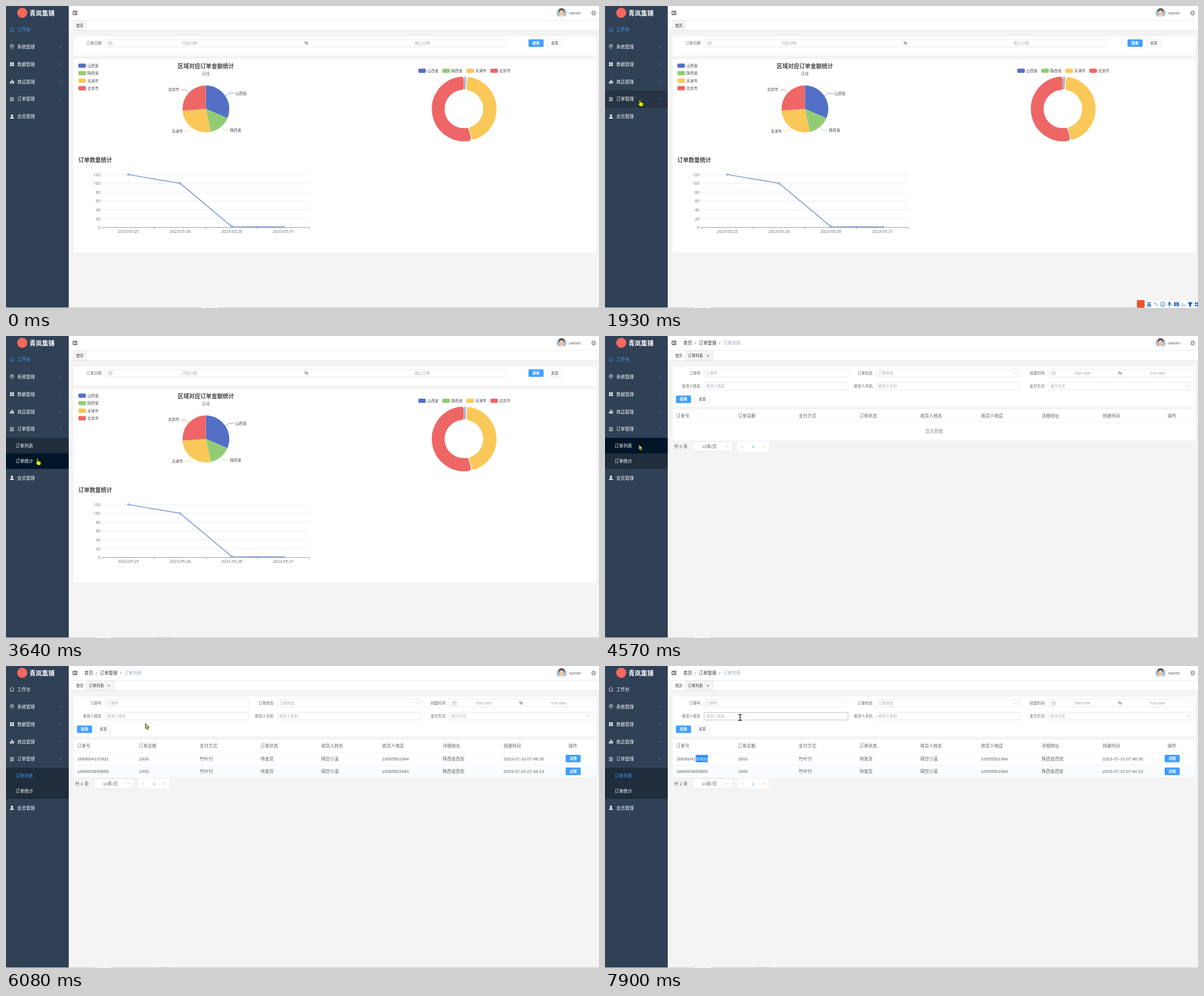
These frames come from a looping animation (1049x534 px, 8 s). An HTML page:

```html
<!DOCTYPE html>
<html>
<head>
<meta charset="utf-8">
<title>Order dashboard</title>
<style>
html, body { margin: 0; width: 100%; height: 100%; overflow: hidden; background: #f4f4f4; }
svg { display: block; width: 100%; height: 100%; }
text { font-family: "Liberation Sans", "Noto Sans CJK SC", sans-serif; white-space: pre; }
.axis text { font-family: "Noto Sans", sans-serif; }
</style>
</head>
<body>
<svg id="stage" viewBox="0 0 1049 534"></svg>
<script>
const LOOP = 8000, BIG = 7.74, SMALL = 6.64;
const BLUE = '#409eff', INK = '#606266', HINT = '#a8abb2', EDGE = '#dcdfe6';
const PALETTE = ['#5470c6', '#91cc75', '#fac858', '#ee6666'];
const REGIONS = ['山西省', '陕西省', '天津市', '北京市'];
const MENU = ['工作台', '系统管理', '数据管理', '商品管理', '订单管理', '会员管理'];
const ORDER_NO = '1689004107831', DIGIT = BIG * 0.5562;

// ---- drawing helpers (text is placed by its vertical centre) ----
const text = (x, y, s, { size = BIG, fill = INK, anchor = 'start', bold = false, id = '' } = {}) =>
  `<text x="${x}" y="${y + size * 0.37}" font-size="${size}" fill="${fill}" text-anchor="${anchor}"` +
  `${bold ? ' font-weight="700"' : ''}${id ? ` id="${id}"` : ''}>${s}</text>`;
const rect = (x, y, w, h, fill, more = '') =>
  `<rect x="${x}" y="${y}" width="${w}" height="${h}" fill="${fill}" ${more}/>`;
const line = (d, stroke = HINT, width = 0.7, more = '') =>
  `<path d="${d}" fill="none" stroke="${stroke}" stroke-width="${width}" ${more}/>`;
const group = (id, body, more = '') => `<g id="${id}" ${more}>${body}</g>`;
const chevron = (x, y, color = HINT) => line(`M${x - 2.6} ${y - 1.3}l2.6 2.6l2.6 -2.6`, color);
const box = (x, y, w, h = 13.3) => rect(x, y, w, h, '#fff', `rx="1.8" stroke="${EDGE}" stroke-width=".7"`);
const small = (x, y, s, fill = HINT, anchor = 'start') => text(x, y, s, { size: SMALL, fill, anchor });
const label = (x, y, s) => small(x, y, s, INK, 'end');
const calendar = (x, y) =>
  line(`M${x - 3.3} ${y - 2.6}h6.6v5.8h-6.6zM${x - 3.3} ${y - .6}h6.6M${x - 1.6} ${y - 3.6}v1.6M${x + 1.6} ${y - 3.6}v1.6M${x - 2} ${y + 1.2}h4`, HINT, 0.6);
const button = (x, y, s, primary, id = '') =>
  (primary ? rect(x, y, 26.6, 13.3, BLUE, 'rx="1.7"') : box(x, y, 26.6)) +
  (id ? rect(x, y, 26.6, 13.3, '#fff', `rx="1.7" id="${id}" opacity="0"`) : '') +
  text(x + 13.3, y + 6.6, s, { size: SMALL, fill: primary ? '#fff' : INK, anchor: 'middle', bold: primary });
const polar = (cx, cy, r, deg) => {
  const a = deg * Math.PI / 180;
  return `${(cx + r * Math.sin(a)).toFixed(2)} ${(cy - r * Math.cos(a)).toFixed(2)}`;
};

// ---- side menu ----
const icons = [
  line('M-3.6 0L0 -3.6L3.6 0M-2.7 -.6V3.6H2.7V-.6', 'currentColor', 0.8),
  line('M0 3.8C-2 1.8 -3 .4 -3 -1A3 2.9 0 0 1 3 -1C3 .4 2 1.8 0 3.8z', 'currentColor', 0.8) + '<circle cy="-.9" r="1.1" fill="none" stroke="currentColor" stroke-width=".7"/>',
  [[-3.4, -3.2], [.4, -3.2], [-3.4, .5], [.4, .5]].map(([x, y]) => rect(x, y, 3, 2.9, 'currentColor')).join(''),
  [[-3.4, 0], [-.9, -3.5], [1.7, -1.4]].map(([x, y]) => rect(x, y, 1.7, 3.5 - y, 'currentColor')).join(''),
  line('M-3.6 -2.4H3.6M-3.6 .2H3.6M-3.6 2.8H3.6M-1.5 -3.4v2M1.6 -.8v2M-1.5 1.8v2', 'currentColor', 0.9),
  '<circle cy="-1.7" r="2" fill="currentColor"/><path d="M-3.5 3.5C-3.5 -.2 3.5 -.2 3.5 3.5z" fill="currentColor"/>'
];
const rowY = i => 41 + 30.9 * i;
const menuItem = i => group('menu' + i,
  rect(0, rowY(i) - 15.5, 111, 31, '#263445', `id="hover${i}" opacity="0"`) +
  `<g transform="translate(10.5 ${rowY(i)})">${icons[i]}</g>` +
  text(20, rowY(i), MENU[i], { fill: 'currentColor' }) +
  (i > 0 && i < 5 ? `<g transform="translate(96.5 ${rowY(i)})"><g id="arrow${i}">${chevron(0, 0, '#7b8797')}</g></g>` : ''),
  'style="color:#fff"');
const subItem = (i, s) => group('sub' + i,
  rect(0, 180 + 27.6 * i, 111, 27.6, '#001528', `id="subHover${i}" opacity="0"`) +
  text(17, 193.7 + 27.6 * i, s, { fill: 'currentColor' }), 'style="color:#fff"');
const sidebar = rect(0, 0, 111, 534, '#304156') +
  '<circle cx="28.7" cy="12" r="9" fill="#f4685f"/>' +
  text(41.5, 12.6, '青岚集铺', { size: 11.1, fill: '#fff', bold: true }) +
  MENU.map((_, i) => menuItem(i)).join('') +
  '<clipPath id="fold"><rect id="foldBox" x="0" y="180" width="111" height="0"/></clipPath>' +
  `<g clip-path="url(#fold)">${rect(0, 180, 111, 55.2, '#1f2d3d')}${subItem(0, '订单列表')}${subItem(1, '订单统计')}</g>`;

// ---- top bar ----
const header = rect(111, 0, 938, 43.5, '#fff') + rect(111, 25, 938, 0.8, '#e6e6e6') + rect(111, 43, 938, 0.8, '#e4e4e4') +
  line('M118 9.3h8.3M121 12.2h5.3M118 15.1h8.3', '#222', 1.2) + '<path d="M117.8 10.7v3l2.2 -1.5z" fill="#222"/>' +
  '<clipPath id="face"><circle cx="982.8" cy="12" r="8.9"/></clipPath><g clip-path="url(#face)">' +
  rect(973, 3, 20, 20, '#a9c0d3') + '<ellipse cx="982.8" cy="21.5" rx="7" ry="5" fill="#eef1f3"/>' +
  '<circle cx="982.8" cy="9.3" r="4.9" fill="#4a3b35"/><ellipse cx="982.8" cy="12" rx="4" ry="4.8" fill="#efc5a2"/></g>' +
  text(996, 12.4, 'owner') +
  line('M1035.6 12.4a4 4 0 1 0 8 0a4 4 0 1 0 -8 0h8M1037.6 12.4a2 4 0 1 0 4 0a2 4 0 1 0 -4 0M1036.3 10.2h6.6M1036.3 14.6h6.6', '#777', 0.6);

// ---- dashboard page ----
const swatch = (x, y, i, tx) => rect(x, y - 3.8, 13.4, 7.6, PALETTE[i], 'rx="2.2"') + small(tx, y, REGIONS[i], '#444');
const legends = REGIONS.map((_, i) => swatch(128, 105.5 + 13.3 * i, i, 144) + swatch(729.3 + 42.5 * i, 114.5, i, 745.3 + 42.4 * i)).join('');
const cuts = [0, 113, 168, 266, 360];
const pie = PALETTE.map((c, i) => `<path fill="${c}" d="M353.6 182L${polar(353.6, 182, 41.4, cuts[i])}A41.4 41.4 0 0 1 ${polar(353.6, 182, 41.4, cuts[i + 1])}z"/>`).join('') +
  line('M388 159L395 154.4H403.5', PALETTE[0]) + small(405.8, 154.3, REGIONS[0], '#444') +
  line('M380 214L386 219.6H394', PALETTE[1]) + small(396.2, 219.4, REGIONS[1], '#444') +
  line('M328.5 215L324 221.7H315.5', PALETTE[2]) + small(313, 221.6, REGIONS[2], '#444', 'end') +
  line('M323 153.5L318.5 148.3H309', PALETTE[3]) + small(306.5, 148, REGIONS[3], '#444', 'end');

// Ring sector with rounded corners: an inset outline fattened by a round-joined stroke
function ringPart(from, to, color) {
  const pt = (r, deg, side) => polar(810.5, 182, r, deg + side * Math.asin(5.1 / r) * 180 / Math.PI);
  const big = to - from > 190 ? 1 : 0;
  return `<path fill="${color}" stroke="${color}" stroke-width="9" stroke-linejoin="round" d="M${pt(38.2, from, 1)}L${pt(52.8, from, 1)}` +
    `A52.8 52.8 0 ${big} 1 ${pt(52.8, to, -1)}L${pt(38.2, to, -1)}A38.2 38.2 0 ${big} 0 ${pt(38.2, from, 1)}z"/>`;
}
const ring = ringPart(4.84, 166.3, PALETTE[2]) + ringPart(166.3, 360, PALETTE[3]) +
  line(`M${polar(810.5, 182, 34.5, 1.6)}L${polar(810.5, 182, 57, 1.6)}`, PALETTE[0], 1.5) +
  line(`M${polar(810.5, 182, 40, 4)}L${polar(810.5, 182, 57, 4)}`, PALETTE[1], 0.4);

const sales = [['2023-05-25', 120], ['2023-05-26', 100], ['2023-05-28', 2], ['2023-05-31', 1]];
const vy = v => 391.5 - v * 0.7792, px = i => 216.6 + 91.4 * i;
let chart = '';
for (let v = 0; v <= 120; v += 20) {
  if (v) chart += line(`M171 ${vy(v)}H536.6`, '#e0e6f1', 0.7);
  chart += text(167, vy(v), v, { size: 7.1, fill: '#6e7079', anchor: 'end' });
}
chart += line('M171 391.6H536.6' + [0, 1, 2, 3, 4].map(i => `M${171 + 91.4 * i} 391.6v3`).join(''), '#6e7079', 0.7);
chart += line('M' + sales.map(([, v], i) => `${px(i)} ${vy(v)}`).join('L'), PALETTE[0], 1.1);
sales.forEach(([day, v], i) => {
  chart += `<circle cx="${px(i)}" cy="${vy(v)}" r="1.5" fill="#fff" stroke="${PALETTE[0]}" stroke-width="1"/>` +
    text(px(i), 398.6, day, { size: 7.1, fill: '#6e7079', anchor: 'middle' });
});
const title = (x, y, s, anchor) => text(x, y, s, { size: 9.96, fill: '#464646', bold: true, anchor });
const home = rect(119, 26, 23, 17, '#f4f4f4', 'stroke="#e2e2e2" stroke-width=".6"') + small(130.6, 34.4, '首页', '#303133', 'middle') +
  rect(120, 54, 924.6, 33.5, '#fff') + rect(120, 94, 924.6, 342, '#fff') +
  label(169, 65.6, '订单日期') + box(175.3, 59, 711) + calendar(184.6, 65.6) +
  small(325, 65.6, '开始日期', HINT, 'middle') + small(531, 65.6, 'To', '#303133', 'middle') + small(736.6, 65.6, '截止日期', HINT, 'middle') +
  button(924.3, 59, '搜索', true) + button(957.3, 59, '重置') +
  title(353.6, 106.3, '区域对应订单金额统计', 'middle') + small(353.6, 120, '区域', '#6e7079', 'middle') +
  legends + pie + ring + title(128, 272, '订单数量统计', 'start') + `<g class="axis">${chart}</g>`;

// ---- order list page ----
const columns = [126, 235.3, 342.8, 450.2, 557.7, 665.2, 772.6, 880.1];
const heads = ['订单号', '订单总额', '支付方式', '订单状态', '收货人姓名', '收货人电话', '详细地址', '创建时间'];
const order = (no, sum, time) => [no, sum, '竹叶付', '待发货', '晴空小溪', '10055501984', '陕西省西安', time];
const orders = [order(ORDER_NO, '1800', '2023-07-10 07:48:30'), order('1689003850665', '1900', '2023-07-10 07:44:13')];
const cells = (list, y, row = -1) => list.map((s, i) => text(columns[i], y, s, { id: row === 0 && i === 0 ? 'number' : '' })).join('');
const row = (r, y) => rect(120, y, 924.6, 22.6, r ? '#fafcff' : '#fff') +
  rect(120, y, 924.6, 22.6, '#f0f3f7', `id="rowHover${r}" opacity="0"`) + rect(120, y + 22, 924.6, 0.6, '#ebeef5') +
  (r ? '' : rect(0, y + 4.6, 0, 13, '#3390ff', 'id="mark"')) + cells(orders[r], y + 11.1, r) +
  (r ? '' : text(0, y + 11.1, '', { fill: '#fff', id: 'marked' })) + button(990, y + 4.4, '详情', true);
const field = (x, y, name) => label(x - 6.3, y + 6.6, name) + box(x, y, 254.6);
const hint = (x, y, s) => small(x + 3.8, y + 6.6, s);
const names = [['订单号', '订单状态', '创建时间'], ['收货人姓名', '收货人手机', '支付方式']];
const fieldX = c => 175.3 + 304.3 * c, fieldY = r => 59 + 23.2 * r;
const form = names.map((list, r) => list.map((s, c) =>
  field(fieldX(c), fieldY(r), s) + (r === 0 && c === 2 ? '' : hint(fieldX(c), fieldY(r), s))).join('')).join('') +
  chevron(726.8, 65.6) + chevron(1031, 88.8) + calendar(793.2, 65.6) +
  small(844.6, 65.6, 'Start date', HINT, 'middle') + small(911, 65.6, 'To', '#303133', 'middle') + small(978, 65.6, 'End date', HINT, 'middle') +
  [0, 1].map(r => `<rect id="focus${r}" x="175.3" y="${fieldY(r)}" width="254.6" height="13.3" rx="1.8" fill="none" stroke="#a9adb6" stroke-width=".8" opacity="0"/>`).join('') +
  button(125.6, 105.3, '搜索', true, 'searchHover') + button(158.7, 105.3, '重置');
const pager = text(122.3, 195.6, '共 0 条', { id: 'total' }) + box(155.3, 186.8, 70.4, 17) +
  text(184.6, 195.6, '10条/页', { anchor: 'middle' }) + chevron(216, 195.6) + rect(234.6, 186.4, 54.6, 17.6, '#fff', 'rx="1"') +
  line('M252.7 186.4v17.6M271 186.4v17.6', '#f4f4f4', 0.8) +
  line('M244.3 193.1l-2.4 2.4l2.4 2.4M278.8 193.1l2.4 2.4l-2.4 2.4', HINT, 0.8) + text(262, 195.6, '1', { fill: BLUE, anchor: 'middle' });
const list = text(138.5, 12.4, '首页', { fill: '#303133' }) + text(158.8, 12.4, '/') + text(166, 12.4, '订单管理', { fill: '#303133' }) +
  text(201.8, 12.4, '/') + text(209, 12.4, '订单列表', { fill: '#97a8be' }) +
  rect(142, 26, 49, 17, '#f4f4f4', 'stroke="#e2e2e2" stroke-width=".6"') + line('M119 26v17', '#e2e2e2', 0.6) +
  small(130.6, 34.4, '首页', '#303133', 'middle') + small(146.6, 34.4, '订单列表', '#303133') + line('M180 33l3.8 3.8M183.8 33l-3.8 3.8', '#555', 0.7) +
  rect(120, 54, 924.6, 70.4, '#fff') + form +
  rect(120, 130, 924.6, 22.4, '#fff') + cells(heads, 140.8) + text(1003, 140.8, '操作', { anchor: 'middle' }) + rect(120, 152, 924.6, 0.6, '#ebeef5') +
  group('empty', rect(120, 152.6, 924.6, 32, '#fff') + text(582.3, 168.6, '暂无数据', { fill: '#909399', anchor: 'middle' })) +
  group('rows', row(0, 152.6) + row(1, 175.2)) + group('pager', pager);

// ---- input method bar ----
const IME = '#1767c5';
const ime = rect(954, 521, 95, 13, '#fff') + rect(941, 520, 13.5, 13.5, '#f0522c', 'rx="1"') +
  text(962.5, 527.4, '英', { size: 8.5, fill: IME, anchor: 'middle', bold: true }) +
  '<circle cx="973" cy="526" r="1" fill="#1767c5"/>' + line('M976.5 527.5l-.8 2', IME, 1.2) +
  line('M982.4 527.4a4 4 0 1 0 8 0a4 4 0 1 0 -8 0M984.2 528.4q2.2 2.4 4.4 0M985 525.6v1M987.8 525.6v1', IME, 0.9) +
  rect(997, 523, 3.2, 5.4, IME, 'rx="1.6"') + line('M995.6 526.5q0 3.2 3 3.2t3 -3.2M998.6 529.7v2', IME, 0.9) +
  rect(1006.5, 524, 9, 6.8, IME, 'rx="1"') + line('M1008 526h6M1008 527.8h6M1009.5 529.5h3', '#fff', 0.7) +
  line('M1022 524v4M1020 531q0 -3 3.5 -3t3.5 3z', '#b4bac2', 1.2) +
  '<path d="M1031 525l2.6 -1.6h3l2.6 1.6l-1 2l-1.2 -.4v5h-3.8v-5l-1.2 .4z" fill="#1767c5"/>' +
  [1043.5, 1047].map(x => rect(x, 524, 2.8, 3, IME) + rect(x, 528, 2.8, 3, IME)).join('');

// ---- pointer shapes, hot spot at 0,0 ----
const pointers =
  group('hand', '<path d="M-1.3 .8Q-1.2 -.4 -.2 -.4T.9 .8V4L4.6 5Q6 5.4 5.9 7L5.5 9.6Q5 11.6 3 11.6H1Q-.2 11.6 -1 10.4L-3.2 7.2Q-3.4 5.9 -2.2 6.1L-1.3 7z" fill="#dcf000" stroke="#20240a" stroke-width=".8"/>') +
  group('arrow', '<path d="M0 0V9.4L2.2 7.4L4 11L5.7 10.2L4 6.8H7z" fill="#d6cb62" stroke="#39361c" stroke-width=".9" stroke-linejoin="round"/>') +
  group('beam', line('M-3 -5.2H3M0 -5.2V5.2M-3 5.2H3', '#4b3828', 1.6));

document.getElementById('stage').innerHTML = rect(0, 0, 1049, 534, '#f4f4f4') + header + group('home', home) + group('list', list) +
  sidebar + rect(0, 533, 1049, 1, '#d0d2d4') + rect(347, 533, 27, 1, '#fafafa', 'id="tab"') + rect(266, 533, 27, 1, '#b9bcc0', 'id="task"') +
  group('ime', ime) + group('pointer', pointers);

// ---- motion ----
const $ = id => document.getElementById(id);
const set = (id, attrs) => { for (const k in attrs) $(id).setAttribute(k, attrs[k]); };
const show = (id, on) => { $(id).style.display = on ? '' : 'none'; };
const clamp = v => Math.min(1, Math.max(0, v));
const ease = (t, a, b) => { const k = clamp((t - a) / (b - a)); return k * k * (3 - 2 * k); };

// Pointer stops: time, x, y
const stops = [
  [70, 1046, 505], [270, 543, 248], [550, 543, 248], [1290, 72, 199], [1370, 72, 199], [1700, 62, 166],
  [2900, 62, 166], [3320, 56, 217], [3860, 56, 217], [4170, 60, 192], [4680, 60, 192], [5120, 412, 194],
  [5180, 412, 194], [5340, 406, 195], [5500, 406, 194], [6060, 246.5, 101.5], [6140, 246.5, 101.5], [6290, 242, 74],
  [6400, 242, 74], [6960, 182, 163.5], [7040, 182, 163.5], [7200, 171, 163.5], [7270, 171, 163.5], [7350, 160.2, 163.5],
  [7500, 160.2, 163.5], [7690, 146, 113], [7880, 239, 91]
];
function pointerAt(t) {
  if (t < stops[0][0]) return [-99, -99];
  for (let i = 1; i < stops.length; i++) {
    const [a, x, y] = stops[i - 1], [b, u, v] = stops[i];
    if (t < b) { const k = ease(t, a, b); return [x + (u - x) * k, y + (v - y) * k]; }
  }
  return stops[stops.length - 1].slice(1);
}
const inside = ([x, y], [l, t, w, h]) => x >= l && x < l + w && y >= t && y < t + h;
// Hover strength: share of the last moments the pointer spent inside the area
function glow(t, area, span = 240) {
  let n = 0;
  for (let i = 0; i < 8; i++) n += inside(pointerAt(t - i * span / 8), area);
  return n / 8;
}
const SEARCH = [125.6, 105.3, 26.6, 13.3];
const FIELDS = [0, 1].map(r => [175.3, fieldY(r), 254.6, 13.3]);

function draw(t) {
  const onList = t >= 4370, loaded = t >= 4660;
  const p = pointerAt(t), open = ease(t, 2150, 2470), drop = 55.2 * open;
  show('home', !onList);
  show('list', onList);
  show('rows', loaded);
  show('empty', !loaded);
  show('ime', t >= 1930 && t < 2000);
  show('task', t >= 2670 && t < 3760 || t >= 5120);
  set('tab', { x: t < 1930 ? 347 : 158 });

  set('foldBox', { height: drop });
  set('menu5', { transform: `translate(0 ${drop})` });
  set('arrow4', { transform: `scale(1 ${1 - 2 * open})` });
  MENU.forEach((_, i) => set('hover' + i, { opacity: glow(t, [0, rowY(i) - 15.5 + (i === 5 ? drop : 0), 111, 31]) }));
  [0, 1].forEach(i => set('subHover' + i, { opacity: glow(t, [0, 180 + 27.6 * i, 111, 27.6]) }));
  const active = 100 * ease(t, 4640, 4940);
  $('menu0').style.color = `color-mix(in srgb, #fff ${active}%, ${BLUE})`;
  $('sub0').style.color = `color-mix(in srgb, ${BLUE} ${active}%, #fff)`;

  if (onList) {
    $('total').textContent = `共 ${loaded ? 2 : 0} 条`;
    set('pager', { transform: `translate(0 ${loaded ? 12.4 : 0})` });
    [0, 1].forEach(r => {
      set('rowHover' + r, { opacity: glow(t, [120, 152.6 + 22.6 * r, 924.6, 22.6]) });
      set('focus' + r, { opacity: glow(t, FIELDS[r], 120) });
    });
    set('searchHover', { opacity: 0.3 * glow(t, SEARCH, 100) });
    const edge = t < 7040 ? 13 : t < 7350 ? Math.round((p[0] - 126) / DIGIT) : 8;
    const x = 126 + edge * DIGIT;
    $('number').textContent = ORDER_NO.slice(0, edge);
    $('marked').textContent = ORDER_NO.slice(edge);
    set('marked', { x });
    set('mark', { x, width: (13 - edge) * DIGIT });
  }

  const overText = onList && (FIELDS.some(f => inside(p, f)) || loaded && inside(p, [126, 157, 57, 13]));
  const overLink = !onList && p[0] < 111 || onList && inside(p, SEARCH);
  const shape = overText ? 'beam' : overLink ? 'hand' : 'arrow';
  ['hand', 'arrow', 'beam'].forEach(id => show(id, id === shape));
  set('pointer', { transform: `translate(${p[0]} ${p[1]})` });
}
function tick() {
  draw(performance.now() % LOOP);
  requestAnimationFrame(tick);
}
tick();
</script>
</body>
</html>
```
